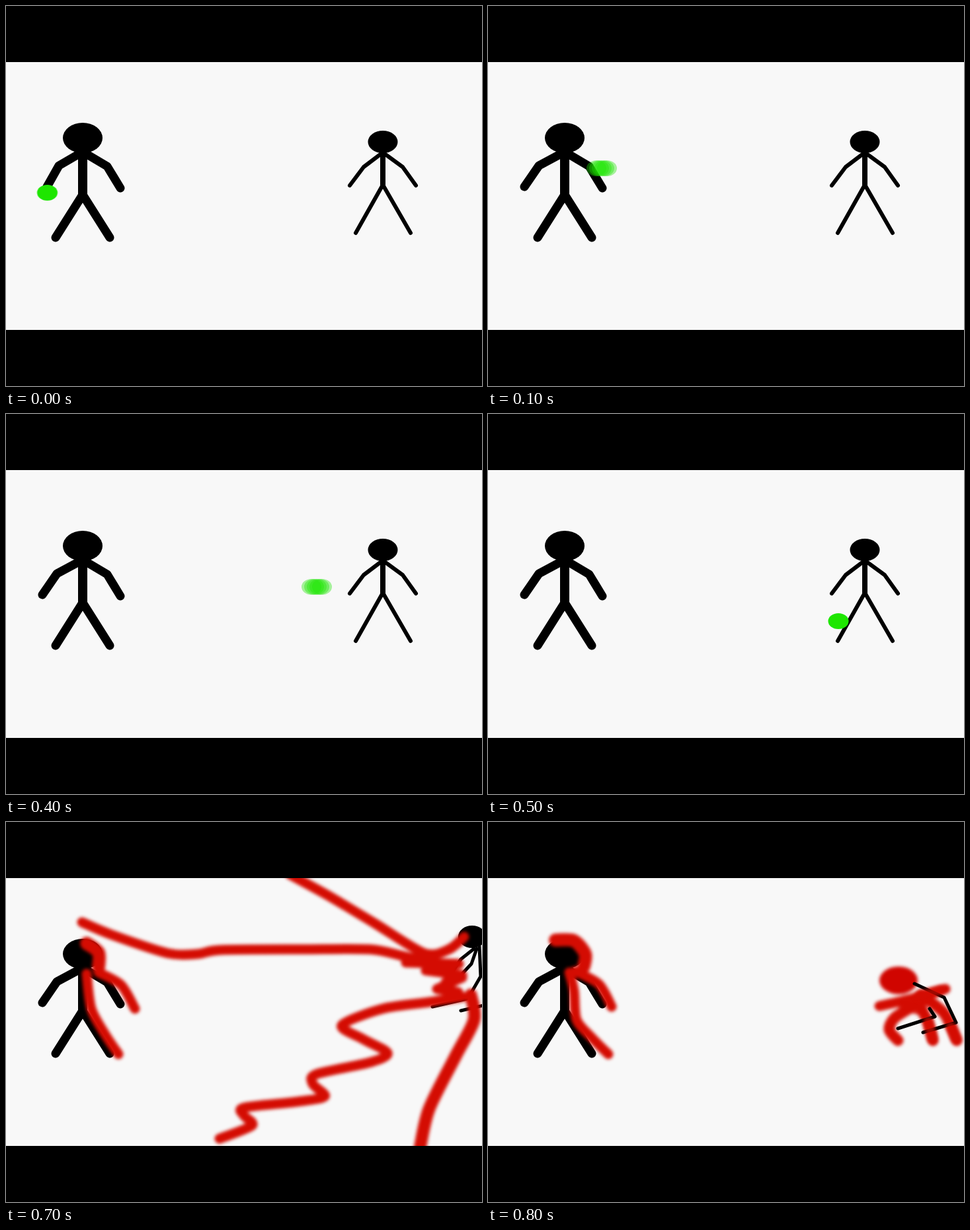
An HTML page for the animation above (0.9 s loop, 720x576 px).

```html
<!DOCTYPE html>
<html lang="en">
<head>
<meta charset="utf-8">
<title>Stick figure throw</title>
<style>
  html, body { margin: 0; width: 100%; height: 100%; overflow: hidden; background: #000; }
  svg { display: block; width: 100%; height: 100%; }
  path { fill: none; stroke-linecap: round; stroke-linejoin: round; }
  .thick { stroke: #000; stroke-width: 13; }
  .thin { stroke: #000; stroke-width: 6; }
  .soft { filter: blur(2.4px); }
  .red path { stroke: #d40c02; stroke-width: 15; }
  .red ellipse { fill: #d00500; }
  .ink path { stroke: #000; stroke-width: 20; }
  .ball ellipse { fill: #1ee600; }
  .scene, .ball { visibility: hidden; animation: 900ms step-end infinite; }
  .ready { animation-name: ready; }
  .thrown { animation-name: thrown; }
  .standing { animation-name: standing; }
  .held { animation-name: held; }
  .flying { animation-name: flying; }
  .blast { animation-name: blast; }
  .knocked { animation-name: knocked; }
  .fallen { animation-name: fallen; }
  @keyframes ready { 0% { visibility: visible } 11.11%, 100% { visibility: hidden } }
  @keyframes thrown { 0% { visibility: hidden } 11.11%, 100% { visibility: visible } }
  @keyframes standing { 0% { visibility: visible } 66.66%, 100% { visibility: hidden } }
  @keyframes blast { 0% { visibility: hidden } 66.66% { visibility: visible } 77.77%, 100% { visibility: hidden } }
  @keyframes knocked { 0% { visibility: hidden } 77.77% { visibility: visible } 88.88%, 100% { visibility: hidden } }
  @keyframes fallen { 0% { visibility: hidden } 88.88%, 100% { visibility: visible } }
  @keyframes held {
    0% { visibility: visible; transform: translate(62.5px, 283px) }
    11.11% { visibility: hidden; transform: translate(62.5px, 283px) }
    55.55% { visibility: visible; transform: translate(530px, 314px) }
    66.66%, 100% { visibility: hidden; transform: translate(530px, 314px) }
  }
  @keyframes flying {
    0% { visibility: hidden; transform: translate(62px, 283px) }
    11.11% { visibility: visible; transform: translate(172px, 246px) }
    22.22% { visibility: visible; transform: translate(285px, 227px) }
    33.33% { visibility: visible; transform: translate(393px, 227px) }
    44.44% { visibility: visible; transform: translate(470px, 262px) }
    55.55%, 100% { visibility: hidden; transform: translate(530px, 314px) }
  }
</style>
</head>
<body>
<svg viewBox="0 0 720 576">
  <defs><clipPath id="stage"><rect y="85" width="720" height="406"/></clipPath></defs>
  <rect width="720" height="576"/>
  <g clip-path="url(#stage)">
    <rect y="85" width="720" height="406" fill="#f8f8f8"/>

    <!-- thrower -->
    <ellipse cx="116" cy="200" rx="30" ry="23"/>
    <g class="thick">
      <path d="M116 222V287" stroke-width="14"/>
      <path d="M116 221L153 243L173 276M75 351L116 286L157 351"/>
      <path class="scene ready" d="M116 221L80 242L62 274"/>
      <path class="scene thrown" d="M116 221L77 242L55 274"/>
    </g>

    <!-- receiver -->
    <g class="scene standing">
      <ellipse cx="570" cy="206" rx="22.5" ry="17"/>
      <path class="thin" d="M520 272L541 244L570 222L600 244L620 272M529 344L570 271L612 344"/>
      <path class="thin" d="M570 222V271" style="stroke-width:8"/>
    </g>

    <g class="ball held"><ellipse rx="15.5" ry="12"/></g>
    <g class="ball flying" id="streak"></g>

    <g class="scene blast">
      <g class="soft red">
        <path data-curve="0 281 70 269 180 254 330 251 480 252 590 262"/>
        <path data-curve="297 142 365 163 420 195 500 235 545 263"/>
        <path data-curve="60 384 140 376 225 380 262 378"/>
        <path data-curve="210 405 250 383 300 352 380 325 450 303 540 280 590 265"/>
        <path data-curve="517 335 545 344 603 342" style="stroke-width:19"/>
        <path data-curve="122 182 141 192 147 214" style="stroke-width:22"/>
        <path data-curve="126 228 132 262 146 308 174 332 181 357"/>
        <path data-curve="136 226 168 238 188 264 187 287"/>
      </g>
      <g class="soft ink">
        <path d="M405 141L430 190L447 300L362 280L420 322L480 349"/>
        <path d="M405 141L456 197L495 284L572 140" style="stroke-width:17"/>
        <path d="M587 153L555 228L533 346"/>
      </g>
      <ellipse cx="571" cy="209" rx="21" ry="17"/>
      <path class="thin" style="stroke-width:5" d="M574 224L556 250M580 222L578 276L562 305L511 315M578 276L604 306L554 320"/>
      <g class="soft red">
        <path data-curve="425 199 450 213 505 238 530 260" opacity=".65" style="stroke-width:10"/>
        <path d="M522 262L532 270" opacity=".8"/>
        <ellipse cx="579" cy="264" rx="21" ry="16"/>
      </g>
    </g>

    <g class="scene knocked">
      <ellipse cx="705" cy="174" rx="21" ry="17"/>
      <path class="thin" style="stroke-width:5" d="M708 192L688 208L676 226M712 192L704 215L690 230M716 188L718 234L703 260M645 280L697 268M688 286L722 278"/>
      <g class="soft red">
        <path data-curve="115 152 160 171 245 199 290 200 325 194 450 193 550 193 600 203 650 214"/>
        <path data-curve="430 80 490 113 560 155 633 199 670 193 693 174"/>
        <path d="M605 213L685 215L635 225L690 232L665 243L690 236L652 253L684 258"/>
        <path data-curve="690 265 640 273 570 283 508 308 540 329 577 350 552 364 470 382 464 397 482 416 440 424 360 433 360 445 372 460 323 480"/>
        <path data-curve="703 262 708 300 680 355 640 435 626 495" style="stroke-width:19"/>
        <path data-curve="122 184 140 198 140 220" style="stroke-width:20"/>
        <path data-curve="122 230 129 283 150 322 170 352"/>
        <path data-curve="140 228 174 247 195 283"/>
      </g>
    </g>

    <g class="scene fallen">
      <g class="soft red">
        <path data-curve="102 179 130 180 147 200 145 219" style="stroke-width:20"/>
        <path data-curve="123 228 130 256 134 300 157 327 182 352"/>
        <path data-curve="132 226 168 246 187 280"/>
        <ellipse cx="621" cy="240" rx="29" ry="21"/>
        <path data-curve="592 279 640 268 692 253"/>
        <path data-curve="645 278 615 297 607 315 620 331" style="stroke-width:17"/>
        <path data-curve="647 268 664 300 673 331" style="stroke-width:17"/>
        <path data-curve="655 262 690 290 709 331" style="stroke-width:17"/>
        <path d="M628 278L655 286" opacity=".8"/>
      </g>
      <path class="thin" style="stroke-width:5" d="M645 245L690 266L708 304L658 319M668 283L676 295L620 313"/>
      <g class="soft red" opacity=".75">
        <path d="M652 264L684 255M666 302L672 328M700 310L708 328"/>
      </g>
    </g>
  </g>
</svg>
<script>
  // Smooth curve through a list of points (Catmull-Rom as cubic Béziers).
  function curveThrough(text) {
    const values = text.split(' ').map(Number);
    const points = [];
    for (let i = 0; i < values.length; i += 2) points.push([values[i], values[i + 1]]);
    const at = i => points[Math.max(0, Math.min(points.length - 1, i))];
    const handle = (i, sign) => at(i).map((v, k) => v + sign * (at(i + 1)[k] - at(i - 1)[k]) / 7);
    let d = 'M' + points[0];
    for (let i = 1; i < points.length; i++) {
      d += 'C' + [handle(i - 1, 1), handle(i, -1), at(i)].join(' ');
    }
    return d;
  }

  document.querySelectorAll('[data-curve]').forEach(path =>
    path.setAttribute('d', curveThrough(path.dataset.curve)));

  // Motion blur: overlapping translucent copies of the ball.
  document.getElementById('streak').innerHTML = [-8, -4, 0, 4, 8].map(x =>
    `<ellipse cx="${x}" rx="15" ry="12" opacity=".38"/>`).join('');
</script>
</body>
</html>
```
